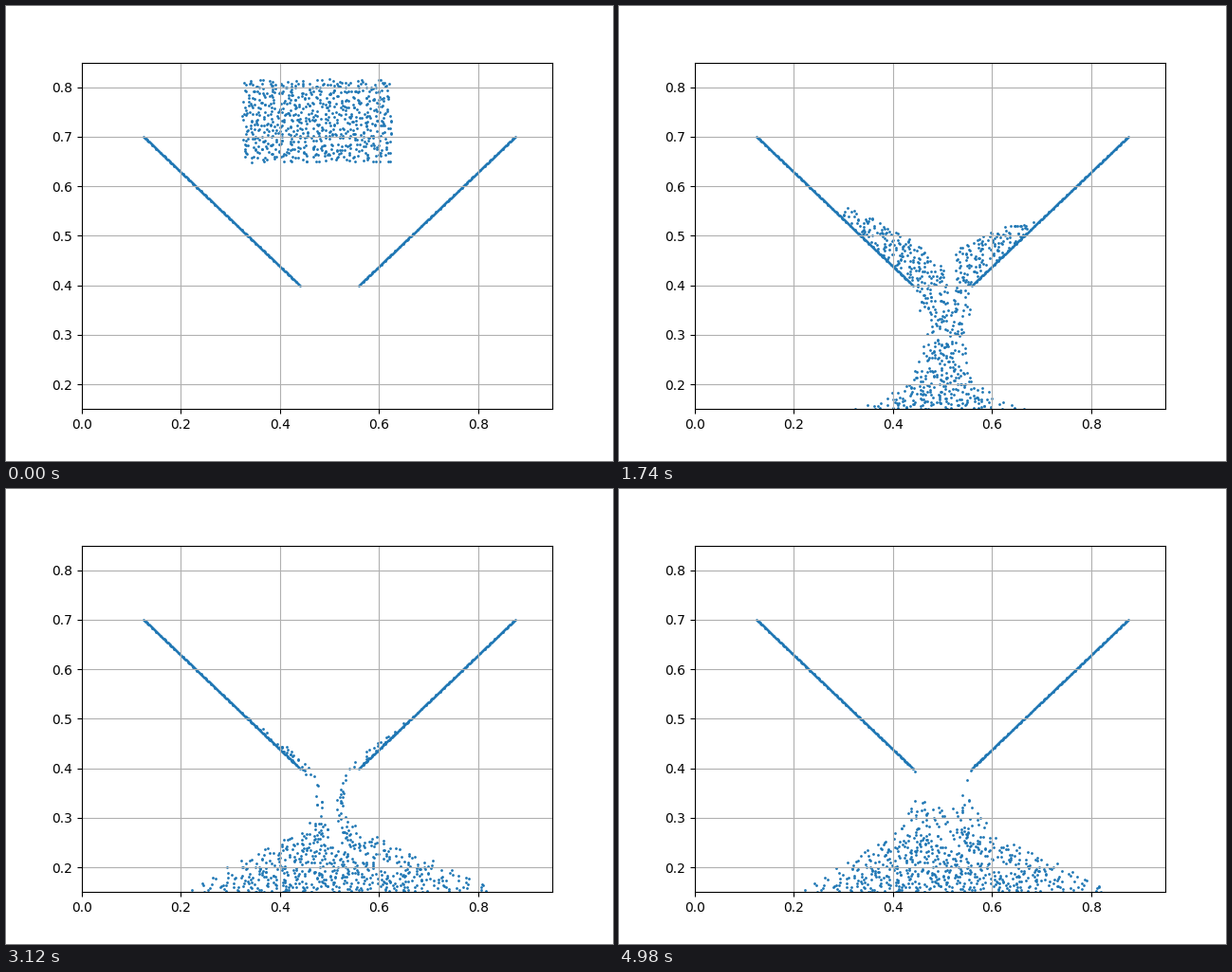
A matplotlib script for the animation above (5010 ms loop, 640x480 px).

```python
import numpy as np
import matplotlib.pyplot as plt
from matplotlib.animation import FuncAnimation

FRAMES, INTERVAL = 167, 30

# Material point simulation of dry sand draining through a funnel
CELLS = 64
DX, INV = 1 / CELLS, CELLS
SUBSTEPS = 16
DT = 0.00765 / SUBSTEPS
GRAVITY = 9.81
YOUNG, POISSON = 150.0, 0.2
SHEAR = YOUNG / (2 * (1 + POISSON))
LAME = YOUNG * POISSON / ((1 + POISSON) * (1 - 2 * POISSON))
SIN_PHI = 0.62
MAX_DILATION = 0.15
FLOOR = 0.141
COLS, ROWS = 36, 20
BOX_LO, BOX_HI = np.array([0.325, 0.65]), np.array([0.624, 0.815])


def seed_sand(rng):
    """Jittered block of grains, slightly denser along its border."""
    gx, gy = np.meshgrid(np.arange(COLS) + 0.5, np.arange(ROWS) + 0.5)
    cells = np.column_stack([gx.ravel(), gy.ravel()])
    cells += rng.uniform(-0.85, 0.85, cells.shape)
    pos = BOX_LO + cells / (COLS, ROWS) * (BOX_HI - BOX_LO)
    return np.clip(pos, BOX_LO, BOX_HI) + rng.normal(0, 0.0009, pos.shape)


def solid_nodes():
    """Flat indices, normals and friction of the nodes inside floor and walls."""
    gx, gy = np.meshgrid(np.arange(CELLS) * DX, np.arange(CELLS) * DX, indexing="ij")
    gx, gy = gx.ravel(), gy.ravel()
    length = np.hypot(0.315, 0.3)
    nx, ny = 0.3 / length, 0.315 / length
    side = np.where(gx < 0.5, 1.0, -1.0)
    reach = 0.06 - np.abs(gx - 0.5)
    dist = reach * nx + (gy - 0.4) * ny
    wall = (gy > 0.4) & (dist <= 0.004)
    floor = gy <= FLOOR
    idx = np.flatnonzero(wall | floor)
    on_floor = floor[idx]
    return (idx, np.where(on_floor, 0, side[idx] * nx),
            np.where(on_floor, 1, ny), np.where(on_floor, 0.65, 1.0))


def simulate():
    pos = seed_sand(np.random.default_rng(7))
    n = len(pos)
    mass = np.prod(BOX_HI - BOX_LO) / n
    x, y = pos.T.copy()
    vx, vy, dil = np.zeros((3, n))
    cxx, cxy, cyx, cyy = np.zeros((4, n))
    bxx, bxy, byy = np.ones(n), np.zeros(n), np.ones(n)
    txx, txy, tyy = np.zeros((3, n))
    oi, oj = (o.reshape(9, 1) for o in np.indices((3, 3)))
    solid, nx, ny, mu = solid_nodes()
    size = CELLS * CELLS
    apic = 4 * INV * INV
    d_rate = SIN_PHI * (SHEAR + LAME) / (2 * SHEAR)

    def spline(f):
        return np.array([0.5 * (1.5 - f) ** 2, 0.75 - (f - 1) ** 2, 0.5 * (f - 0.5) ** 2])

    states = [pos]
    for step in range(1, (FRAMES - 1) * SUBSTEPS + 1):
        # Particles to grid
        bi, bj = (x * INV - 0.5).astype(int), (y * INV - 0.5).astype(int)
        fx, fy = x * INV - bi, y * INV - bj
        w = (spline(fx)[:, None] * spline(fy)[None]).reshape(9, n)
        dx, dy = (oi - fx) * DX, (oj - fy) * DX
        node = (bi + oi) * CELLS + bj + oj
        flat = node.ravel()
        k = DT * apic
        px = w * (vx + (cxx - k * txx) * dx + (cxy - k * txy) * dy)
        py = w * (vy + (cyx - k * txy) * dx + (cyy - k * tyy) * dy)
        m = np.maximum(np.bincount(flat, w.ravel(), size), 1e-9)
        gx = np.bincount(flat, px.ravel(), size) / m
        gy = np.bincount(flat, py.ravel(), size) / m - DT * GRAVITY

        # Frictional contact
        sx, sy = gx[solid], gy[solid]
        vn = np.minimum(sx * nx + sy * ny, 0)
        tx, ty = sx - vn * nx, sy - vn * ny
        keep = np.maximum(0, 1 + mu * vn / (np.hypot(tx, ty) + 1e-9))
        gx[solid], gy[solid] = tx * keep, ty * keep

        # Grid to particles
        ux, uy = w * gx[node], w * gy[node]
        vx, vy = ux.sum(0), uy.sum(0)
        cxx, cxy = apic * (ux * dx).sum(0), apic * (ux * dy).sum(0)
        cyx, cyy = apic * (uy * dx).sum(0), apic * (uy * dy).sum(0)
        x = np.clip(x + DT * vx, 0.04, 0.96)
        y = np.clip(y + DT * vy, 0.04, 0.96)

        # Elastic strain with a cohesionless friction limit
        a, b, c, d = 1 + DT * cxx, DT * cxy, DT * cyx, 1 + DT * cyy
        exx = a * a * bxx + 2 * a * b * bxy + b * b * byy
        exy = a * c * bxx + (a * d + b * c) * bxy + b * d * byy
        eyy = c * c * bxx + 2 * c * d * bxy + d * d * byy
        mid, half = (exx + eyy) / 2, (exx - eyy) / 2
        rad = np.hypot(half, exy) + 1e-12
        c2, s2 = half / rad, exy / rad
        e1 = 0.5 * np.log(mid + rad)
        e2 = 0.5 * np.log(np.maximum(mid - rad, 1e-6))
        trace = e1 + e2 + dil
        dil = np.clip(trace, 0, MAX_DILATION)
        trace = np.minimum(trace, 0)
        dev = np.minimum((e1 - e2) / 2, -d_rate * trace)
        l1, l2 = np.exp(trace + 2 * dev), np.exp(trace - 2 * dev)
        mid, rad = (l1 + l2) / 2, (l1 - l2) / 2
        bxx, bxy, byy = mid + rad * c2, rad * s2, mid - rad * c2
        p, q = (SHEAR + LAME) * trace, 2 * SHEAR * dev
        txx, txy, tyy = p + q * c2, q * s2, p - q * c2

        if step % SUBSTEPS == 0:
            states.append(np.column_stack([x, y]))
    return states, mass


states, _ = simulate()

t = np.linspace(0, 1, 200)
left = np.column_stack([0.125 + 0.315 * t, 0.7 - 0.3 * t])
walls = np.vstack([left, np.column_stack([1 - left[:, 0], left[:, 1]])])

fig, ax = plt.subplots(figsize=(6.4, 4.8), dpi=100)
ax.set_aspect("equal")
ax.set_xlim(0, 0.95)
ax.set_ylim(0.15, 0.85)
ax.set_xticks(np.arange(0, 0.9, 0.2))
ax.set_yticks(np.arange(0.2, 0.85, 0.1))
ax.grid(True)
dots = ax.scatter(*np.vstack([walls, states[0]]).T, s=1, color="C0")


def update(frame):
    dots.set_offsets(np.vstack([walls, states[frame]]))
    return dots,


anim = FuncAnimation(fig, update, frames=FRAMES, interval=INTERVAL, repeat=True)
plt.show()
```
